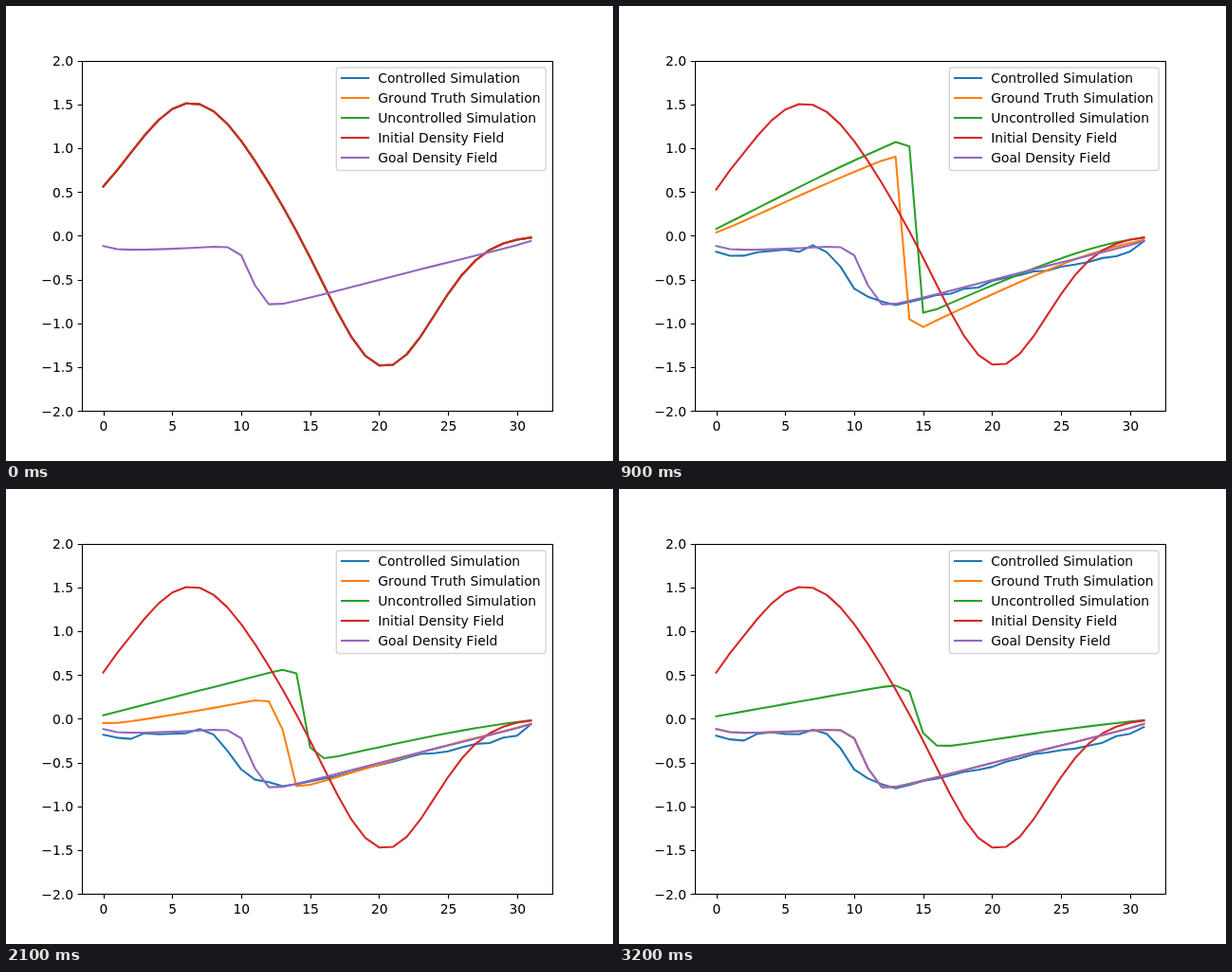
Animation of 640x480 px, one loop 3.3 s. Source, as an HTML page:

```html
<!DOCTYPE html>
<html lang="en">
<head>
<meta charset="utf-8">
<title>Density field simulation</title>
<style>
  html, body { margin: 0; width: 100%; height: 100%; overflow: hidden; background: #fff; }
  svg { display: block; }
  text { font: 13.889px "DejaVu Sans", sans-serif; font-kerning: none; fill: #000; }
  .axis { fill: none; stroke: #000; stroke-width: 1.11; }
  .line { fill: none; stroke-width: 2.083; stroke-linejoin: round; stroke-linecap: square; }
</style>
</head>
<body>
<svg id="plot" width="640" height="480" viewBox="0 0 640 480"></svg>
<script>
const CELLS = 32, STEPS = 32, FRAME_MS = 100;
const SERIES = [
  ['Controlled Simulation', '#1f77b4'],
  ['Ground Truth Simulation', '#ff7f0e'],
  ['Uncontrolled Simulation', '#2ca02c'],
  ['Initial Density Field', '#d62728'],
  ['Goal Density Field', '#9467bd']
];

// ---- Fields: Burgers equation on 32 cells, zero outside ----
const field = fn => Array.from({ length: CELLS }, (_, i) => fn(i));
const bell = (x, amp, mid, variance) => amp * Math.exp(-((x - mid) ** 2) / (2 * variance));
const at = (u, i) => u[i] || 0;
const lerp = (a, b, k) => a + (b - a) * k;

function sample(u, x) {
  const i = Math.floor(x);
  return lerp(at(u, i), at(u, i + 1), x - i);
}
const diffuse = u => field(i => u[i] + 0.09 * (at(u, i - 1) + at(u, i + 1) - 2 * u[i]));
const advect = u => field(i => sample(u, i - 0.96 * u[i]));

function simulate(start, force) {
  const states = [start];
  for (let n = 0; n < STEPS; n++) {
    const next = advect(diffuse(states[n]));
    states.push(field(i => next[i] + 0.03 * force(i)));
  }
  return states;
}

const initial = field(i => bell(i, 1.517, 6.4, 20.6) + bell(i, -1.505, 20.36, 13.1));
const smoothed = diffuse(initial);
const free = simulate(initial, () => 0);
const truth = simulate(initial, i => bell(i, -0.845, 13, 94));
const goal = truth[STEPS];

// Controlled run: falls quickly to a settled curve, then jitters around it
const bends = [
  [0, -0.185], [1, -0.23], [2, -0.23], [3, -0.17], [6, -0.18], [7, -0.125], [8, -0.17],
  [9, -0.345], [10, -0.585], [11, -0.7], [13, -0.775], [17, -0.665], [20, -0.53],
  [23, -0.405], [26, -0.34], [30, -0.175], [31, -0.08]
];
const settled = field(i => {
  const k = Math.max(1, bends.findIndex(([x]) => x >= i));
  const [x0, y0] = bends[k - 1], [x1, y1] = bends[k];
  return lerp(y0, y1, (i - x0) / (x1 - x0));
});

function jitter(n, i) {
  const s = Math.sin(n * 12.9898 + i * 78.233) * 43758.5453;
  return 0.04 * (s - Math.floor(s) - 0.5);
}

function controlled(n) {
  const rest = Math.exp(-n);
  return field(i => lerp(settled[i] + jitter(n, i), initial[i], rest));
}

// ---- Drawing ----
const plot = document.getElementById('plot');
const px = x => 80 + (x + 1.55) / 34.1 * 496;
const py = y => 242.4 - y * 92.4;
const snap = v => Math.floor(v + 0.5) + 0.5;

function add(tag, attrs, text) {
  const el = document.createElementNS('http://www.w3.org/2000/svg', tag);
  for (const key in attrs) el.setAttribute(key, attrs[key]);
  if (text) el.textContent = text;
  return plot.appendChild(el);
}

let ticks = '';
for (let x = 0; x <= 30; x += 5) {
  ticks += `M${snap(px(x))} 427.5v4.86`;
  add('text', { x: px(x) + 0.3, y: 448, 'text-anchor': 'middle' }, String(x));
}
for (let y = -2; y <= 2; y += 0.5) {
  ticks += `M80.5 ${snap(py(y))}h-4.86`;
  add('text', { x: 71, y: Math.round(py(y) + 5.3), 'text-anchor': 'end' },
    y.toFixed(1).replace('-', '\u2212'));
}
add('path', { class: 'axis', d: ticks });
const lines = SERIES.map(([, stroke]) => add('path', { class: 'line', stroke }));
add('rect', { class: 'axis', x: 80.5, y: 58.5, width: 496, height: 369 });

add('rect', {
  x: 348.3, y: 65, width: 220.8, height: 108.5, rx: 2.8,
  fill: '#fff', 'fill-opacity': 0.8, stroke: '#ccc', 'stroke-opacity': 0.8, 'stroke-width': 1.39
});
SERIES.forEach(([name, stroke], i) => {
  const y = 76 + 21 * i;
  add('path', { class: 'line', stroke, d: `M354 ${y}h28` });
  add('text', { x: 392.2, y: y + 5 }, name);
});

const trace = u => 'M' + u.map((v, i) => px(i).toFixed(2) + ' ' + py(v).toFixed(2)).join('L');

let shown = -1;
function draw() {
  const n = Math.floor(performance.now() / FRAME_MS) % (STEPS + 1);
  if (n !== shown) {
    shown = n;
    [controlled(n), truth[n], free[n], n ? smoothed : initial, goal]
      .forEach((u, i) => lines[i].setAttribute('d', trace(u)));
  }
  requestAnimationFrame(draw);
}
draw();
</script>
</body>
</html>
```
